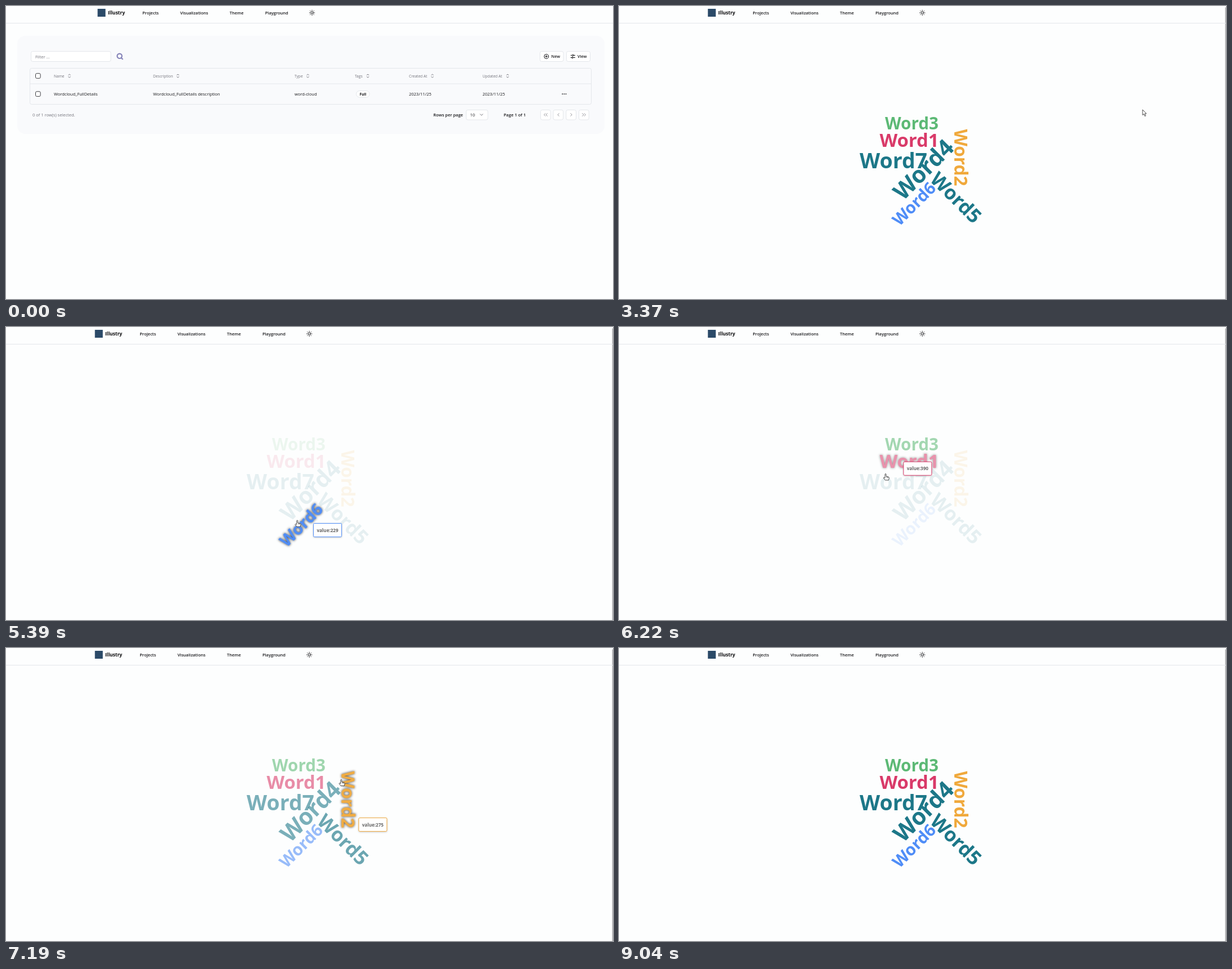
These frames come from a looping animation (1077 px wide and 520 px high, 9.51 s). An HTML page:

```html
<!DOCTYPE html>
<html lang="en">
<head>
<meta charset="utf-8">
<title>Word cloud</title>
<style>
html, body { margin: 0; width: 100%; height: 100%; overflow: hidden; background: #fdfefe; }
svg { display: block; width: 1077px; height: 520px; font-family: "Open Sans", "Noto Sans", sans-serif; }
text { white-space: pre; }
.shadow { filter: drop-shadow(0 1px 1.5px #0003); }
.icon { fill: none; stroke-width: 1; stroke-linecap: round; stroke-linejoin: round; }
</style>
</head>
<body>
<svg id="stage" viewBox="0 0 1077 520"></svg>
<script>
const LOOP = 9510, PAGE_SWITCH = 3190;
const INK = '#18181b', GREY = '#74747c', LINE = '#e4e7eb';

const text = (x, y, s, size = 7.5, weight = 400, fill = INK, extra = '') =>
  `<text x="${x}" y="${y}" font-size="${size}" font-weight="${weight}" fill="${fill}" ${extra}>${s}</text>`;
const box = (x, y, w, h, r = 3, fill = '#fff', stroke = LINE, extra = '') =>
  `<rect x="${x}" y="${y}" width="${w}" height="${h}" rx="${r}" fill="${fill}" stroke="${stroke}" ${extra}/>`;
const icon = (d, stroke = INK, extra = '') => `<path class="icon" d="${d}" stroke="${stroke}" ${extra}/>`;
const group = (id, body, extra = '') => `<g id="${id}" ${extra}>${body}</g>`;

function header() {
  let rays = '';
  for (let i = 0; i < 8; i++) {
    const c = Math.cos(i * Math.PI / 4), s = Math.sin(i * Math.PI / 4);
    rays += `M${543 + 3.7 * c} ${12 + 3.7 * s}L${543 + 4.7 * c} ${12 + 4.7 * s}`;
  }
  return box(162.5, 5, 14, 14, 0, '#2b4a68', 'none') +
    text(180.8, 15.2, 'Illustry', 8.5, 700, '#09090b') +
    [[242, 'Projects'], [309, 'Visualizations'], [396.7, 'Theme'], [459.7, 'Playground']]
      .map(([x, s]) => text(x, 14.8, s, 7.5, 600)).join('') +
    '<circle class="icon" cx="543" cy="12" r="2.1" stroke="#18181b"/>' + icon(rays);
}

function table() {
  const sorter = x => icon(`M${x - 1.8} 122.8l1.8-1.8 1.8 1.8M${x - 1.8} 125.4l1.8 1.8 1.8-1.8`, '#77777f', 'stroke-width=".8"');
  const columns = [[85, 'Name', 112.5], [261, 'Description', 305], [512, 'Type', 535.5],
    [619, 'Tags', 642], [715, 'Created At', 756.5], [845.5, 'Updated At', 890]];
  const cells = [[85, 'Wordcloud_FullDetails'], [261, 'Wordcloud_FullDetails description'],
    [512, 'word-cloud'], [715, '2023/11/25'], [845.5, '2023/11/25']];
  const check = y => box(52.5, y, 8.6, 8.6, 2, '#fff', '#3a3a3e');
  return box(42.5, 110.5, 996, 64, 3, 'none') + icon('M43 138H1038', LINE) +
    check(119.7) + check(151.8) +
    columns.map(([x, s, sx]) => text(x, 126.5, s, 6.6, 500, GREY) + sorter(sx)).join('') +
    cells.map(([x, s]) => text(x, 159, s)).join('') +
    box(621.5, 150.5, 23.5, 11.5, 5.7) + text(627.5, 158.6, 'Full', 6.4, 700) +
    group('rowButton', box(981.5, 147, 18, 18, 3, '#f1f2f4', 'none')) +
    [987.3, 990.4, 993.5].map(x => `<circle cx="${x}" cy="156.2" r=".9" fill="${INK}"/>`).join('');
}

function pager() {
  const left = x => `M${x + 1.2} 190.6l-2.4 2.4 2.4 2.4`, right = x => `M${x - 1.2} 190.6l2.4 2.4-2.4 2.4`;
  const buttons = [[948.5, left(955.8) + left(959.2)], [971, left(980)],
    [993.8, right(1003)], [1016.5, right(1023.8) + right(1027.2)]];
  return text(47, 195.7, '0 of 1 row(s) selected.', 7.5, 400, GREY) +
    text(758.3, 195.7, 'Rows per page', 7.5, 600) + box(816.5, 184.5, 38.5, 17.5) + text(823.5, 195.7, '10') +
    icon('M841.3 191.8l2.4 2.4 2.4-2.4', GREY) + text(883, 195.7, 'Page 1 of 1', 7.5, 600) +
    buttons.map(([x, d]) => box(x, 184.5, 17.7, 17.5) + icon(d, '#96969c')).join('');
}

function listPage() {
  return header() + box(20, 53, 1042, 174, 14, '#f9fafc', 'none') +
    box(44.5, 80.5, 141.5, 18) + text(52, 92.7, 'Filter ...', 7.5, 400, GREY) +
    '<circle cx="201.5" cy="88.8" r="4.2" fill="none" stroke="#8583b8" stroke-width="2.2"/>' +
    icon('M204.8 92.2l2 2', '#8583b8', 'style="stroke-width:2.2"') +
    box(947.5, 80.5, 41.5, 18) + '<circle class="icon" cx="958.7" cy="89.5" r="3.9" stroke="#18181b"/>' +
    icon('M956.8 89.5h3.8M958.7 87.6v3.8') + text(967.5, 92.3, 'New', 7.2, 600) +
    box(994.5, 80.5, 42, 18) + icon('M1002.2 87.5h2.2M1007.5 87.5h2M1002.2 91.5h1.5M1006.5 91.5h3') +
    '<circle class="icon" cx="1005.9" cy="87.5" r="1.3" stroke="#18181b"/><circle class="icon" cx="1005" cy="91.5" r="1.3" stroke="#18181b"/>' +
    text(1014, 92.3, 'View', 7.2, 600) + table() + pager() +
    group('menu', box(909, 168, 90, 46.3, 3, '#fff', LINE, 'class="shadow"') +
      group('menuHover', box(911, 170.3, 86, 18.6, 2, '#f4f4f5', 'none')) +
      text(916, 182.3, 'View') + text(916, 205.6, 'Delete') +
      text(976.5, 205.2, '⌘⌫', 6.4, 400, '#85858c', 'style="font-family:\'DejaVu Sans\',sans-serif"'));
}

// label, value, centre x, centre y, size, angle, colour
const words = [
  ['Word3', 310, 519.5, 208.5, 29.6, 0, '#5cb975'],
  ['Word1', 390, 515, 238.3, 32.8, 0, '#d93a69'],
  ['Word7', 712, 487, 274.8, 37.4, 0, '#1c7788'],
  ['Word4', 843, 540, 290, 41, -45, '#1c7788'],
  ['Word2', 275, 606.3, 269, 31.6, 90, '#f0a93c'],
  ['Word5', 455, 598, 340, 34.6, 45, '#1c7788'],
  ['Word6', 229, 523.3, 351, 29.4, -45, '#4f8df7']
];

const cloudPage = () => group('cloudHeader', header(), 'transform="translate(-4.8 0)"') +
  group('cloud', words.map(([s, , x, y, size, angle, color], i) =>
    group('word' + i, text(0, size * .357, s, size, 700, color, 'text-anchor="middle"'),
      `transform="translate(${x} ${y}) rotate(${angle})"`)).join('')) +
  icon('M1076.3 3V520', '#a9a9ac', 'style="stroke-width:1.4"') +
  group('tip', box(0, 0, 50, 24, 2, '#fff', '#000', 'id="tipBox" class="shadow"') +
    text(25, 15.1, '', 8.1, 700, '#666', 'id="tipText" text-anchor="middle"'));

const pointers = group('arrow', '<path d="M0 0V9.6L2.2 7.6 4 11.6 5.6 10.9 3.9 7H6.8Z" fill="#fff" stroke="#222" stroke-width=".8"/>') +
  group('hand', '<path d="M-1 1Q0-.6 1 1V5L5.2 6Q6.6 6.4 6.3 8L5.5 11.7H-.7L-3.7 7.8Q-3.4 6.4-2.2 7L-1 8Z" fill="#fff" stroke="#222" stroke-width=".8" stroke-linejoin="round"/>' +
    icon('M2.4 5.6V7.4M4.2 6V7.6', '#222', 'style="stroke-width:.6"'));

const stage = document.getElementById('stage');
stage.innerHTML = group('listPage', listPage()) + group('cloudPage', cloudPage()) +
  icon('M0 30.5H1077', LINE) + pointers;

const $ = id => document.getElementById(id);
const clamp = v => Math.max(0, Math.min(1, v));
const show = (id, on) => $(id).setAttribute('display', on ? 'inline' : 'none');
const move = (id, [x, y]) => $(id).setAttribute('transform', `translate(${x} ${y})`);

// time, x, y of the pointer tip
const path = [
  [130, 1050, 450], [500, 1012, 300], [970, 990, 155], [1110, 990, 155], [1640, 920, 176],
  [1780, 922, 177], [2040, 922, 177], [2110, 929, 184], [3650, 929, 184], [3900, 760, 215],
  [4130, 612, 236], [4350, 598, 241], [4500, 598, 242], [4760, 597, 305], [4950, 595, 350],
  [5200, 545, 330], [5350, 520, 355], [5600, 500, 280], [5850, 520, 207], [6110, 491, 234],
  [6220, 473, 260], [6400, 470, 280], [6560, 520, 350], [6800, 600, 345], [6995, 612, 330],
  [7080, 612, 297], [7190, 595, 233], [7400, 545, 212], [7540, 510, 235], [7640, 488, 280],
  [7750, 495, 251], [7950, 560, 240], [8110, 606, 250], [8490, 1010, 255], [8770, 1066, 508]
];
// time and label of the word under the pointer
const hovers = [
  [4130, 'Word2'], [4800, 'Word5'], [5130, 'Word6'], [5450, 'Word7'], [5740, 'Word3'],
  [6160, 'Word1'], [6260, 'Word7'], [6480, 'Word6'], [6740, 'Word5'], [6995, ''],
  [7145, 'Word2'], [7400, 'Word3'], [7540, 'Word1'], [7610, 'Word7'], [7830, 'Word1'],
  [7940, 'Word4'], [8040, 'Word2'], [8170, '']
];

function pointerAt(t) {
  const i = path.findIndex(p => p[0] > t);
  if (i < 1) return (i ? path[path.length - 1] : path[0]).slice(1);
  const [t0, x0, y0] = path[i - 1], [t1, x1, y1] = path[i], k = (t - t0) / (t1 - t0);
  return [x0 + (x1 - x0) * k, y0 + (y1 - y0) * k];
}

// Each change of focus starts a 300 ms cubic ease-out from the current opacity.
function wordOpacity(label, t) {
  let from = 1, to = 1, start = 0;
  const at = time => to + (from - to) * (1 - clamp((time - start) / 300)) ** 3;
  for (const [time, focus] of hovers) {
    if (time > t) break;
    const goal = !focus || focus === label ? 1 : .1;
    if (goal !== to) [from, to, start] = [at(time), goal, time];
  }
  return at(t);
}

function drawCloud(t) {
  const index = hovers.filter(h => h[0] <= t).length - 1;
  const focus = index < 0 ? '' : hovers[index][1];
  $('cloud').setAttribute('opacity', clamp((t - PAGE_SWITCH) / 180));
  words.forEach(([label], i) => {
    const el = $('word' + i);
    el.setAttribute('opacity', wordOpacity(label, t));
    el.style.filter = label === focus ? 'drop-shadow(0 0 2.2px #333)' : 'none';
  });
  show('tip', index >= 0);
  if (index >= 0) {
    const [time] = hovers[index];
    const [, value, , , , , color] = words.find(w => w[0] === (focus || hovers[index - 1][1]));
    const [x, y] = pointerAt(Math.min(t, focus ? t : time) - 110);
    move('tip', [x + 14, y + 5]);
    $('tip').setAttribute('opacity', focus ? 1 : 1 - clamp((t - time - 100) / 200));
    $('tipBox').setAttribute('stroke', color);
    $('tipText').textContent = 'value:' + value;
  }
  return focus;
}

function draw(t) {
  const onCloud = t >= PAGE_SWITCH;
  show('listPage', !onCloud);
  show('cloudPage', onCloud);
  show('rowButton', t >= 900);
  show('menu', t >= 1110);
  $('menu').setAttribute('opacity', clamp((t - 1040) / 140));
  show('menuHover', t >= 1500);
  const focus = onCloud ? drawCloud(t) : '';
  const visible = t >= 130 && t < 8840;
  show('arrow', visible && !focus);
  show('hand', visible && focus);
  move('arrow', pointerAt(t));
  move('hand', pointerAt(t));
}

const begin = performance.now();
function tick() {
  draw((performance.now() - begin) % LOOP);
  requestAnimationFrame(tick);
}
tick();
</script>
</body>
</html>
```
